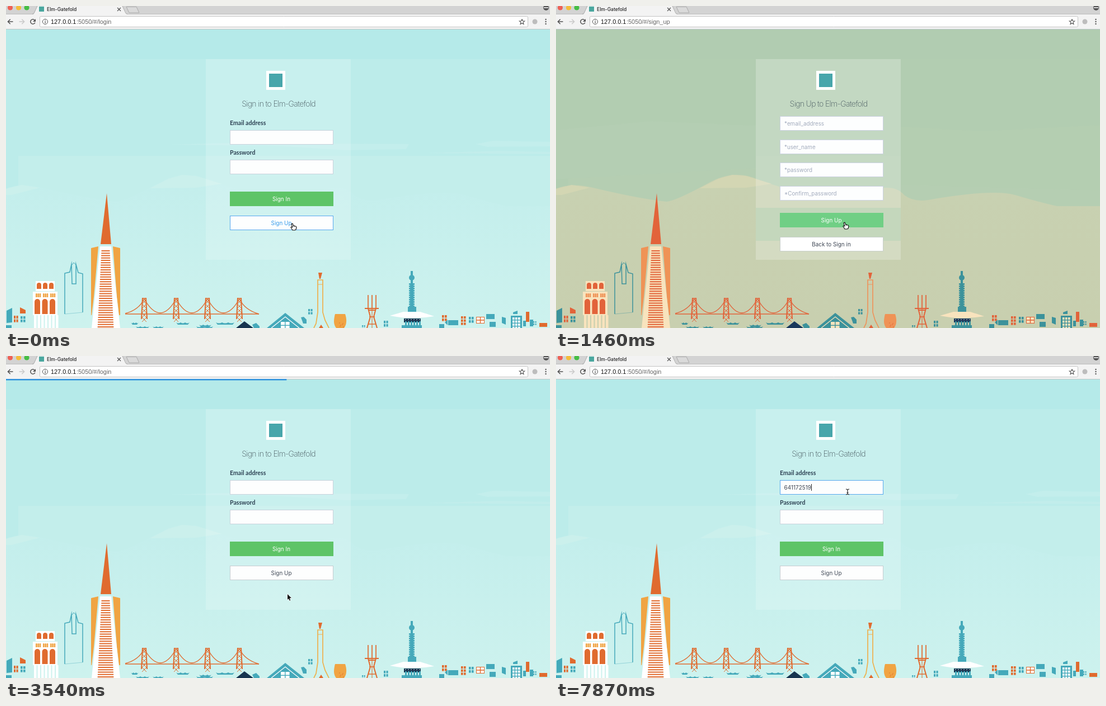
These frames come from a looping animation (972x576 px, 8 s). An HTML page with a canvas:

```html
<!DOCTYPE html>
<html lang="en">
<head>
<meta charset="utf-8">
<title>Sign in</title>
<style>
html, body { margin: 0; width: 100%; height: 100%; overflow: hidden; background: #fff; }
canvas { display: block; width: 972px; height: 576px; }
</style>
</head>
<body>
<canvas id="stage" width="972" height="576"></canvas>
<script>
const c = document.getElementById('stage').getContext('2d');
const LOOP = 8000, TO_SIGNUP = 150, TO_LOGIN = 3540;
const BRAND = 'Elm-Gatefold', TYPED = '641172519';
const KEY_TIMES = [5110, 5510, 5960, 6100, 6250, 6400, 7130, 7430, 7720];
const UI = 'Inter, sans-serif', BLUE = '#3399ea', INK = '#3d4553';

const DAY = {
  sky: ['#b5eae9', '#bcecea', '#c3eeeb'], hill: ['#c3eeec', '#cdf2ee'], glow: '#cbf0ec',
  teal: '#45a9ba', orange: '#e06b2f', wing: '#f0a443', pale: '#ffffff', line: '#efb04c', navy: '#17344f'
};
const DUSK = {
  sky: ['#b1ccb1', '#b2cdb1', '#b5ceb2'], hill: ['#c8d1b1', '#c8cfaf'], glow: '#d3d6b3',
  teal: '#3c929b', orange: '#e2633a', wing: '#ef9356', pale: '#f8e3bd', line: '#ee945c', navy: '#19375c'
};
let p = DAY;

function rect(x, y, w, h, fill) { c.fillStyle = fill; c.fillRect(x, y, w, h); }

function trace(pts) {
  c.beginPath();
  for (let i = 0; i < pts.length; i += 2) c.lineTo(pts[i], pts[i + 1]);
}
function poly(pts, fill) { trace(pts); c.fillStyle = fill; c.fill(); }
function stroke(pts, color, width = 1) {
  trace(pts); c.strokeStyle = color; c.lineWidth = width; c.stroke();
}
function disc(x, y, r, fill) {
  c.beginPath(); c.arc(x, y, r, 0, 7); c.fillStyle = fill; c.fill();
}
function box(x, y, w, h, fill, edge) {
  rect(x, y, w, h, fill);
  if (edge) { c.strokeStyle = edge; c.lineWidth = 1; c.strokeRect(x + .5, y + .5, w - 1, h - 1); }
}
function text(s, x, y, font, fill, align = 'left', track = 0) {
  c.font = font; c.fillStyle = fill; c.textAlign = align; c.letterSpacing = track + 'px';
  c.fillText(s, x, y);
}
function arch(x, y, w, h, fill) {
  c.beginPath();
  c.moveTo(x, y + h); c.lineTo(x, y + w / 2);
  c.arc(x + w / 2, y + w / 2, w / 2, Math.PI, 0);
  c.lineTo(x + w, y + h); c.fillStyle = fill; c.fill();
}
function panes(x, y, w, h, cols, rows, fill) {
  const cw = w / cols, ch = h / rows;
  for (let i = 0; i < cols; i++)
    for (let j = 0; j < rows; j++) rect(x + i * cw, y + j * ch, cw - 1.4, ch - 1.4, fill);
}

function landscape() {
  rect(0, 41, 972, 535, p.sky[0]);
  rect(0, 95, 972, 481, p.sky[1]);
  rect(22, 268, 950, 308, p.sky[2]);
  if (p === DAY) {
    poly([295, 248, 400, 245, 720, 247, 715, 256, 610, 258, 480, 250], '#c3eeec');
    poly([840, 247, 870, 241, 972, 243, 972, 251, 860, 252], '#c3eeec');
    poly([755, 263, 880, 259, 972, 261, 972, 265], '#c2edeb');
  } else {
    poly([0, 222, 170, 206, 357, 214, 357, 290, 0, 310], '#b4ceb3');
    poly([616, 216, 760, 224, 972, 213, 972, 330, 616, 320], '#b4ceb1');
  }
  const g = c.createLinearGradient(0, 310, 0, 576);
  g.addColorStop(0, p.hill[0]); g.addColorStop(1, p.hill[1]);
  c.beginPath();
  c.moveTo(0, 327);
  c.quadraticCurveTo(28, 315, 70, 326);
  c.quadraticCurveTo(150, 345, 198, 350);
  c.quadraticCurveTo(215, 348, 270, 318);
  c.quadraticCurveTo(318, 290, 362, 311);
  c.quadraticCurveTo(470, 350, 540, 338);
  c.quadraticCurveTo(600, 312, 622, 338);
  c.quadraticCurveTo(638, 351, 665, 347);
  c.quadraticCurveTo(780, 327, 820, 338);
  c.quadraticCurveTo(860, 350, 895, 358);
  c.lineTo(972, 358); c.lineTo(972, 576); c.lineTo(0, 576);
  c.fillStyle = g; c.fill();
  poly([257, 326, 290, 309, 315, 302, 340, 304, 385, 318, 340, 325], p.glow);
  poly([0, 327, 28, 320, 60, 325, 10, 338, 0, 338], p.glow);
}

function archTower() {
  rect(53, 492, 34, 18, p.pale);
  for (const x of [55, 66, 77]) arch(x, 495, 8, 11, p.orange);
  rect(48, 511, 44, 42, p.pale);
  for (let i = 0; i < 3; i++) {
    for (let k = 0; k < 3; k++) arch(53 + i * 13 + k * 3.3, 514, 2.6, 7, p.wing);
    arch(51 + i * 13.5, 524, 10, 27, p.orange);
  }
  for (let x = 50; x < 90; x += 6.5) rect(x, 553, 4.5, 23, p.pale);
}

function pyramid() {
  poly([180, 335, 188, 426, 169, 426], p.orange);
  poly([152, 433, 165, 430, 157, 520, 153, 553, 152, 553], p.wing);
  poly([191, 430, 204, 433, 204, 553, 202, 553, 198, 520], p.wing);
  poly([168, 430, 188, 430, 204, 576, 153, 576], p.pale);
  for (let y = 437; y < 576; y += 4.25) {
    const k = (y - 437) / 139;
    rect(170.5 - 7 * k, y, 15 + 14 * k, 2, p.orange);
  }
}

function bridge() {
  const towers = [247, 304, 360, 417];
  stroke([213, 551, 452, 551], p.orange, 1.7);
  c.beginPath(); c.moveTo(213, 550); c.quadraticCurveTo(237, 544, 247, 524);
  for (let i = 1; i < 4; i++)
    c.quadraticCurveTo((towers[i - 1] + towers[i]) / 2, 574, towers[i], 524);
  c.quadraticCurveTo(427, 544, 452, 551);
  c.lineWidth = 1.5; c.stroke();
  for (const x of towers) {
    stroke([x - 3, 522, x - 5, 560], p.orange, 2);
    stroke([x + 3, 522, x + 5, 560], p.orange, 2);
    stroke([x - 4, 523, x + 4, 523], p.orange, 1.5);
    for (let y = 525; y < 558; y += 8) {
      stroke([x - 4, y, x + 4, y + 8], p.orange);
      stroke([x + 4, y, x - 4, y + 8], p.orange);
    }
  }
  for (const [x, y, w] of [[223, 566, 14], [304, 566, 24], [345, 570, 22], [375, 566, 33], [232, 573, 24], [262, 573, 20], [340, 573, 30]]) {
    c.beginPath(); c.moveTo(x, y);
    for (let k = 0; k < 3; k++) c.quadraticCurveTo(x + (k + .5) * w / 3, y + 3, x + (k + 1) * w / 3, y);
    c.lineTo(x + w - 3, y + 4); c.lineTo(x + 3, y + 4);
    c.fillStyle = p.teal; c.fill();
  }
}

function houses() {
  poly([411, 576, 426, 564, 442, 576], p.navy);
  poly([440, 570, 447, 567, 453, 573, 453, 576, 443, 576], p.teal);
  poly([466, 576, 499, 549, 533, 576], p.teal);
  stroke([474, 576, 499, 556, 524, 576], p.pale, 1.3);
  panes(491, 565, 17, 14, 2, 2, p.pale);
  poly([527, 557, 532, 556, 537, 561, 537, 568, 531, 568], p.teal);
  panes(540, 542, 9, 11, 2, 2, p.teal);
}

function landmarks() {
  poly([558, 477, 565, 477, 562, 488, 560, 488], p.orange);
  stroke([550, 576, 554, 568, 557, 548, 557, 490, 566, 490, 566, 548, 570, 562, 577, 576], p.line, 1.7);
  stroke([557, 498, 566, 498], p.line);

  c.beginPath(); c.moveTo(588, 551); c.lineTo(606, 551);
  c.bezierCurveTo(610, 563, 608, 572, 603, 577); c.lineTo(591, 577);
  c.bezierCurveTo(585, 571, 585, 563, 588, 551);
  c.fillStyle = p.wing; c.fill();
  for (let i = 0; i < 6; i++) disc(596 + i * 5 % 9, 567 + i * 3 % 8, .8, p.orange);
  poly([559, 576, 563, 570, 567, 576], p.orange);

  for (const x of [647, 654, 661]) stroke([x, 517, x, 541], p.orange, 1.7);
  stroke([647, 541, 651, 556, 645, 576], p.orange, 2);
  stroke([661, 541, 657, 556, 663, 576], p.orange, 2);
  stroke([654, 541, 654, 576], p.orange);
  stroke([641, 541, 666, 541], p.orange, 2);
  stroke([648, 544, 660, 544], p.orange, 2);
  stroke([649, 556, 659, 556], p.orange, 1.5);
  stroke([647, 569, 661, 569], p.orange, 1.5);

  rect(723, 474, 4, 8, p.teal);
  disc(725, 486, 5, p.teal);
  rect(723, 490, 4, 7, p.teal);
  for (let y = 496; y < 538; y += 4) rect(720, y, 10, 2.8, p.teal);
  rect(722, 496, 6, 43, p.teal);
  rect(718, 538, 15, 9, p.teal);
  c.beginPath(); c.moveTo(686, 554);
  c.quadraticCurveTo(700, 550, 710, 547); c.lineTo(740, 547);
  c.quadraticCurveTo(750, 550, 765, 555);
  c.quadraticCurveTo(725, 562, 686, 554);
  c.fillStyle = p.pale; c.fill();
  rect(711, 559, 30, 7, p.navy);
  for (let x = 713; x < 740; x += 5) { rect(x, 564, 3, 12, p.teal); disc(x + 1, 561, .8, p.pale); }
  rect(707, 571, 36, 5, p.teal);
}

function smallBlocks() {
  poly([1, 545, 11, 540, 11, 566, 1, 567], p.teal);
  panes(14, 554, 9, 13, 2, 2, p.orange);
  poly([25, 539, 35, 544, 35, 550, 25, 550], p.orange);
  panes(26, 555, 10, 12, 2, 2, p.teal);
  rect(0, 571, 10, 5, p.teal);
  panes(636, 571, 7, 9, 2, 2, p.teal);
  panes(675, 563, 9, 12, 2, 2, p.teal);
  panes(779, 553, 10, 12, 2, 2, p.orange);
  rect(774, 569, 9, 7, p.teal);
  rect(790, 562, 18, 9, p.teal);
  poly([784, 566, 789, 561, 789, 571], p.teal);
  panes(813, 555, 10, 17, 2, 3, p.orange);
  panes(827, 556, 10, 12, 2, 2, p.teal);
  box(840, 556, 15, 12, p.pale, p.orange);
  stroke([847.5, 556, 847.5, 568], p.orange, 1.5);
  stroke([840, 562, 855, 562], p.orange, 1.5);
  rect(858, 551, 15, 9, p.teal);
  rect(864, 565, 11, 9, p.teal);
  poly([886, 556, 893, 558, 893, 570, 886, 567], p.teal);
  rect(902, 554, 20, 22, p.teal);
  panes(905, 557, 15, 22, 3, 4, p.pale);
  poly([906, 548, 914, 545, 914, 551, 906, 551], p.teal);
  rect(929, 547, 6, 18, p.orange);
  rect(924, 563, 5, 10, p.teal);
  rect(936, 561, 6, 12, p.teal);
  rect(953, 567, 14, 7, p.orange);
  panes(942, 564, 7, 8, 2, 2, p.teal);
}

function skyline() {
  archTower();
  stroke([105, 551, 105, 478, 114, 476, 117, 462, 118, 497, 125, 497, 125, 462, 129, 477, 137, 479, 137, 548], p.teal, 1.5);
  stroke([118, 463, 121, 459, 125, 463], p.teal);
  c.globalAlpha = .4;
  stroke([105, 551, 137, 548], p.teal);
  c.globalAlpha = 1;
  pyramid(); bridge(); houses(); landmarks(); smallBlocks();
}

function browser(path) {
  rect(0, 0, 972, 15, '#d3d3d3');
  rect(0, 14, 972, 27, '#f3f3f3');
  rect(0, 14, 972, 1, '#bcbcbc');
  poly([49, 15, 56, 0, 208, 0, 216, 15], '#f3f3f3');
  stroke([47, 14.5, 50, 13, 56, 0], '#aaa');
  stroke([208, 0, 214, 13, 217, 14.5], '#aaa');
  trace([215, 1.5, 233, 1.5, 238, 12, 220, 12]); c.closePath();
  c.fillStyle = '#dadada'; c.fill(); c.strokeStyle = '#aaa'; c.stroke();
  disc(7.5, 3, 4.6, '#ee6056'); disc(22.5, 3, 4.6, '#f4bd3a'); disc(37, 3, 4.6, '#46be45');
  rect(59, 1, 9, 9, '#4aa79f');
  text(BRAND, 73, 9, '500 8.5px ' + UI, '#222');
  stroke([199, 3, 205, 9], '#555', 1.2); stroke([205, 3, 199, 9], '#555', 1.2);
  disc(965, 3, 5, '#555'); rect(961, 2, 8, 2, '#d3d3d3');

  for (const [x, s, col] of [[8, -1, '#505050'], [28, 1, '#c9c9c9']]) {
    stroke([x - 4.5, 28, x + 4.5, 28], col, 1.5);
    stroke([x + s * .3, 23.7, x + s * 4.6, 28, x + s * .3, 32.3], col, 1.5);
  }
  c.beginPath(); c.arc(48, 28, 4.2, .4, 5.5); c.strokeStyle = '#505050'; c.lineWidth = 1.5; c.stroke();
  poly([53, 23, 53, 28, 48, 28], '#505050');
  c.beginPath(); c.roundRect(60.5, 18.5, 872, 19, 2);
  c.fillStyle = '#fff'; c.fill(); c.strokeStyle = '#c3c3c3'; c.lineWidth = 1; c.stroke();
  c.beginPath(); c.arc(70, 28, 4.6, 0, 7); c.strokeStyle = '#555'; c.stroke();
  rect(69.4, 27.3, 1.3, 3.5, '#555'); rect(69.4, 25, 1.3, 1.3, '#555');
  const f = '10.9px "Liberation Sans", sans-serif';
  text('127.0.0.1', 80, 32, f, '#111');
  text(':5050/#/' + path, 126, 32, f, '#666');
  const star = [];
  for (let i = 0; i <= 10; i++) {
    const a = i * Math.PI / 5 - Math.PI / 2, r = i % 2 ? 2.2 : 5;
    star.push(922 + r * Math.cos(a), 28.5 + r * Math.sin(a));
  }
  stroke(star, '#555', 1.1);
  disc(945, 28, 4.5, '#bdbdbd');
  for (const y of [24, 28, 32]) disc(964.5, y, 1.2, '#555');
  rect(0, 41, 972, 1, '#b9c6c5');
}

function heading(s) {
  rect(465, 116, 34, 34, '#fff');
  rect(470, 121, 24, 24, '#48a6ab');
  text(s, 487, 179.5, '200 14px ' + UI, '#44555c', 'center', -.65);
}
function button(s, y, fill, color, edge) {
  box(400, y, 185, 26, fill, edge);
  text(s, 492, y + 16.5, '9.8px ' + UI, color, 'center', .05);
}
function field(y, edge = '#c9d2dc') { box(400, y, 185, 26, '#fdfefe', edge); }

function login(t) {
  rect(357, 95, 259, 359, 'rgba(255,255,255,.18)');
  heading('Sign in to ' + BRAND);
  const bold = '700 10.6px Lato, sans-serif';
  text('Email address', 400, 213, bold, '#2c4052');
  text('Password', 400, 265.5, bold, '#2c4052');
  const focused = t >= 4340;
  field(222, !focused ? undefined : t < 4640 ? '#8299ae' : '#57a8ee');
  field(275);
  if (focused) {
    const count = KEY_TIMES.filter(k => t >= k).length;
    const s = TYPED.slice(0, count);
    text(s, 407.5, 239, '9.8px ' + UI, INK, 'left', .1);
    const sinceKey = t - (count ? KEY_TIMES[count - 1] : 4340);
    if (sinceKey % 1000 < 500) rect(Math.round(408 + c.measureText(s).width), 229, 1, 12, '#222');
  }
  button('Sign In', 332, '#5ec467', '#fff');
  const hover = t < TO_SIGNUP;
  button('Sign Up', 375, '#fdfefe', hover ? BLUE : INK, hover ? '#57a8ee' : '#c6ccd0');
}

function signUp(t) {
  rect(357, 95, 259, 359, 'rgba(255,255,255,.22)');
  rect(357, 361, 259, 59, 'rgba(165,207,174,.35)');
  heading('Sign Up to ' + BRAND);
  ['*email_address', '*user_name', '*password', '*Confirm_password'].forEach((s, i) => {
    const y = Math.round(197 + i * 41.6);
    field(y, '#ccd2e2');
    text(s, 408, y + 16.5, '9.8px ' + UI, '#a2abbd');
  });
  button('Sign Up', 370, t < 1900 ? '#70cf85' : '#5ec467', '#fff');
  const hover = t >= 2700;
  button('Back to Sign in', 413, '#fff', hover ? BLUE : INK, hover ? '#3f94cf' : '#c8cfcb');
}

function loadingBar(age) {
  if (age < 0 || age > 800) return;
  const w = age < 210 ? 500 + 287 * age / 210 : age < 360 ? 787 : 972;
  c.globalAlpha = age < 500 ? 1 : 1 - (age - 500) / 300;
  rect(0, 41, w, 2.5, '#2f92dd');
  c.globalAlpha = 1;
}

const PATH = [
  [0, 514, 395], [1310, 514, 395], [1460, 518, 393], [1610, 518, 393], [2210, 511, 409],
  [2700, 504, 424], [3200, 503, 430], [3600, 503, 430], [4200, 521, 243], [LOOP, 521, 243]
];
function pointerAt(t) {
  const i = PATH.findIndex(k => k[0] > t), a = PATH[i - 1], b = PATH[i];
  let k = (t - a[0]) / (b[0] - a[0]);
  k = k * k * (3 - 2 * k);
  return [a[1] + (b[1] - a[1]) * k, a[2] + (b[2] - a[2]) * k];
}
function outlined(pts) {
  trace(pts); c.closePath();
  c.lineJoin = 'round';
  c.lineWidth = 1.4;
}
function pointer(t) {
  const [x, y] = pointerAt(t);
  c.save(); c.translate(Math.round(x), Math.round(y));
  if (t < 1900) {
    outlined([-4, -5, -2, -6, 0, -1, 1, -2, 2, -1, 4, -1, 5, 1, 4, 5, 2, 6, -2, 6, -5, 1, -4, 0, -2, 1]);
    c.fillStyle = '#fff'; c.fill(); c.strokeStyle = '#111'; c.lineWidth = 1.1; c.stroke();
  } else if (t < 4150) {
    outlined([0, -4, 0, 6, 2, 4, 4, 8, 5, 7, 4, 3, 7, 3]);
    c.strokeStyle = '#fff'; c.stroke(); c.fillStyle = '#111'; c.fill();
  } else {
    stroke([-3, -5, 0, -4, 3, -5], '#222', 1.1);
    stroke([-3, 5, 0, 4, 3, 5], '#222', 1.1);
    stroke([0, -4, 0, 4], '#222', 1.2);
    stroke([-1.5, 1.5, 1.5, 1.5], '#222');
  }
  c.restore();
}

function frame(now) {
  const t = now % LOOP, joining = t >= TO_SIGNUP && t < TO_LOGIN;
  p = joining ? DUSK : DAY;
  landscape();
  skyline();
  (joining ? signUp : login)(t);
  browser(joining ? 'sign_up' : 'login');
  loadingBar(t - (joining ? TO_SIGNUP : TO_LOGIN));
  pointer(t);
  requestAnimationFrame(frame);
}
requestAnimationFrame(frame);
</script>
</body>
</html>
```
